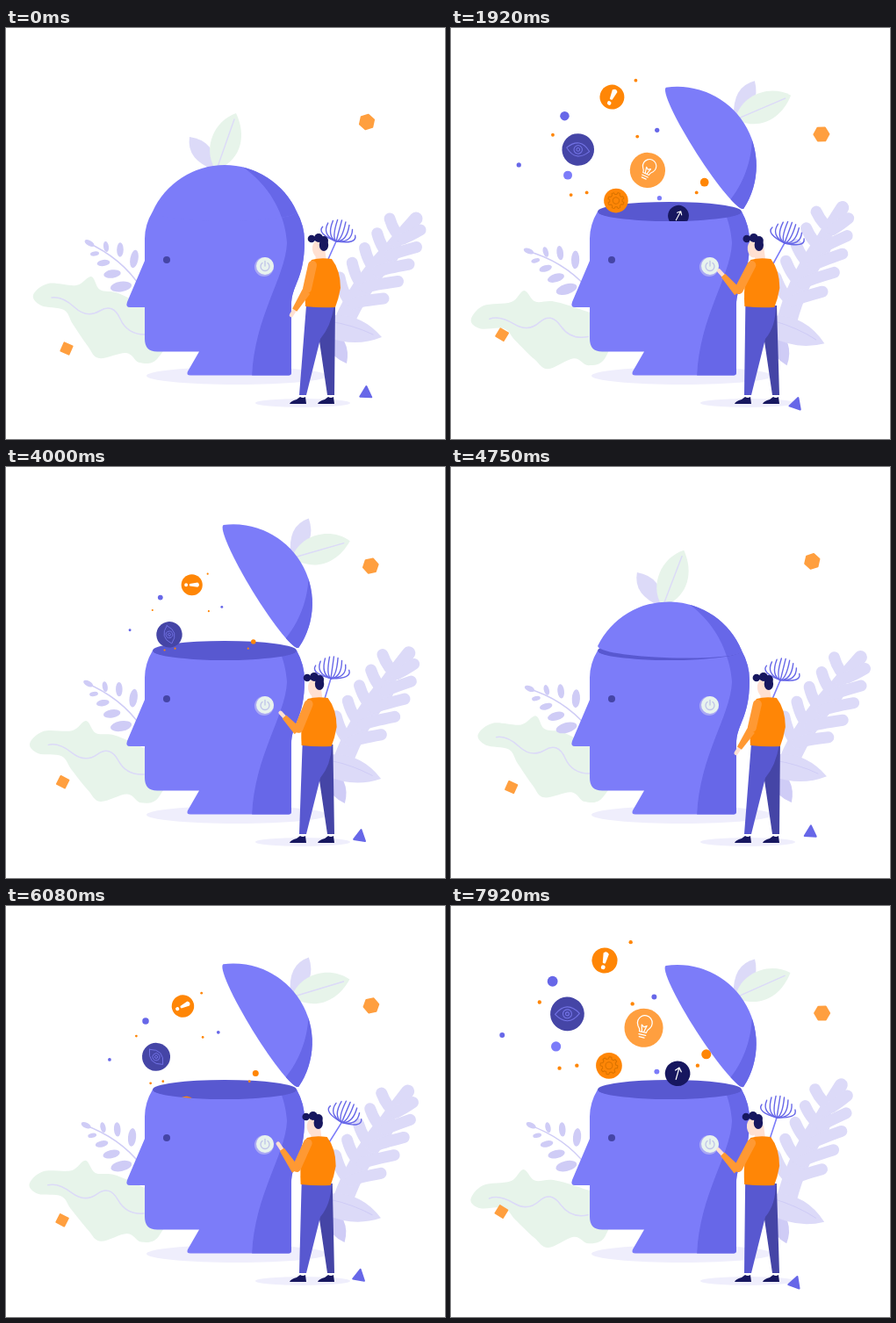
An HTML page with a canvas for the animation above (8 s loop, 500 px wide and 468 px high).

```html
<!DOCTYPE html>
<html>
<head>
<meta charset="utf-8">
<style>
  html, body { margin: 0; width: 100%; height: 100%; overflow: hidden; background: #fff; }
  canvas { display: block; }
</style>
</head>
<body>
<canvas width="500" height="468"></canvas>
<script>
const ctx = document.querySelector('canvas').getContext('2d');
const LOOP = 8000, CYCLE = 5000, TAU = 2 * Math.PI;
const MAIN = '#7c7cf9', SHADE = '#6767e8', INSIDE = '#5858d0', NAVY = '#17175f', INDIGO = '#4545a6';
const ORANGE = '#ff8606', AMBER = '#ff9f3f', SLEEVE = '#ff9933', SKIN = '#ffe0d2';
const GREEN = '#e7f4ea', LILAC = '#dcdaf8', MAUVE = '#cfccf6', SHADOW = '#efeefc';

const clamp = v => Math.max(0, Math.min(1, v));
const mix = (a, b, u) => a + (b - a) * u;
function ease(t, from, to) {
  const u = clamp((t - from) / (to - from));
  return u * u * (3 - 2 * u);
}

// Everything that moves, derived from the time within one cycle.
function pose(time) {
  const t = time % CYCLE;
  const sway = .52 * (1 - Math.cos(t / CYCLE * TAU));
  const lean = sway * sway;
  const open = ease(t, 0, 950) * (1 - ease(t, 4200, 4815));
  const reach = ease(t, 0, 600) * (1 - ease(t, 3700, 4850));
  return {
    sway,
    lid: (59.2 - 2 * sway) * open,
    spread: 11 * sway,
    hand: [mix(325, 311 - 7 * lean, reach), mix(327, 269 + 9 * lean, reach)],
    elbow: [mix(342, 331 - 5 * lean, reach), mix(300, 301, reach)],
    hip: -(5 + 2 * lean) * reach,
    head: -(5 + 7.5 * lean) * reach,
    flight: flight(t)
  };
}

// Coins drift out ever more slowly, then drop back: 0 is mid-air, 1 nearly at rest.
function flight(t) {
  const fall = Math.max(0, t - 3500) / 800;
  return 1.1 * (1 - Math.exp((830 - Math.min(t, 3500)) / 970)) - 2.7 * fall * fall;
}

const fill = (d, color) => { ctx.fillStyle = color; ctx.fill(new Path2D(d)); };
function line(d, color, width) {
  ctx.strokeStyle = color;
  ctx.lineWidth = width;
  ctx.lineCap = ctx.lineJoin = 'round';
  ctx.stroke(new Path2D(d));
}
function oval(x, y, rx, ry, color, deg = 0) {
  ctx.fillStyle = color;
  ctx.beginPath();
  ctx.ellipse(x, y, rx, ry, deg * Math.PI / 180, 0, TAU);
  ctx.fill();
}
const dot = (x, y, r, color) => oval(x, y, r, r, color);
function place(x, y, deg, draw, scale = 1) {
  ctx.save();
  ctx.translate(x, y);
  ctx.rotate(deg * Math.PI / 180);
  ctx.scale(scale, scale);
  draw();
  ctx.restore();
}
const pivot = (x, y, deg, draw) => place(x, y, deg, () => { ctx.translate(-x, -y); draw(); });
function clipped(d, draw) {
  ctx.save();
  ctx.clip(new Path2D(d));
  draw();
  ctx.restore();
}
// Closed Catmull-Rom outline through a few points.
function outline(points) {
  const n = points.length, at = i => points[(i + n) % n];
  const handle = (i, sign) => [0, 1].map(k => at(i)[k] + sign * (at(i + 1)[k] - at(i - 1)[k]) / 6);
  return points.reduce((d, p, i) => `${d}C${handle(i, 1)} ${handle(i + 1, -1)} ${at(i + 1)}`, `M${points[0]}`);
}

const BUSH = outline([[31, 304], [48, 291], [80, 293], [97, 283], [107, 298], [128, 302], [158, 318], [190, 340],
  [172, 377], [152, 381], [137, 370], [106, 376], [93, 362], [76, 337], [66, 321], [40, 316]]);
const BODY = 'M167 209Q158 224 158 240V265L138 312Q136 318 141 318H158V354Q158 368.5 172 368.5H220L207 391Q205 395.5 210 395.5'
  + 'H322Q325 395.5 325 392V316C325 292 340 287 340 243Q340 225 331 209Z';
const LID = 'M167 209A90 90 0 0 1 331 209A82 11 0 0 1 167 209Z';
const SIDE = 'M254 150C280 160 317 195 320 245C318 285 282 330 280 400H360V150Z';
const ABOVE_RIM = 'M0 0H500V209H331A82 11 0 0 1 167 209H0Z';

const ring = r => `M${r} 0A${r} ${r} 0 1 1 ${-r} 0A${r} ${r} 0 1 1 ${r} 0`;
function bang() {
  fill('M-1.6 3L-3.2 -8Q0 -12 3.2 -8L1.6 3Q0 4 -1.6 3Z', '#fff');
  dot(0, 8, 2.4, '#fff');
}
const eye = () => line('M-14 0Q0 -16 14 0Q0 16 -14 0Z' + ring(5) + ring(2), '#7373e6', 1.1);
function gear() {
  let d = ring(4);
  for (let i = 0; i <= 64; i++) {
    const a = i / 64 * TAU, r = i % 8 < 4 ? 10 : 7.8;
    d += `${i ? 'L' : 'M'}${r * Math.cos(a)} ${r * Math.sin(a)}`;
  }
  line(d, '#d97300', 1.1);
}
const bulb = () => line('M-4 5Q-4 2 -7 -1A8.5 8.5 0 1 1 7 -1Q4 2 4 5ZM-4 8H4M-3 11H3M-1 5L-3 -3L0 -1L3 -3L1 5', '#fff', 1.3);
const arrow = () => line('M0 7V-7M-3.5 -3L0 -7L3.5 -3', '#fff', 1.3);

// Resting places. Coins are in order of launch: each later one starts deeper in the head.
const coins = [
  [174, 60, 14.6, ORANGE, bang, 12], [131, 121, 19.5, INDIGO, eye, -3], [179, 180, 15, ORANGE, gear, 0],
  [219, 136, 22.3, AMBER, bulb, 12], [258, 188, 14.5, NAVY, arrow, 15]
];
const specks = [[204, 39], [99, 108], [206, 110], [122, 184], [142, 181], [281, 181]];
const beads = [[56, 146, 3], [231, 102, 3], [114, 84, 6]];
const lateBeads = [[118, 159, 5.7], [234, 188, 3]];

function drawCoins(q) {
  const left = 1 - q;
  const grow = start => clamp((q - start) / .1);
  const along = (x, y, depth) => [x + .39 * left * (268 - x), y + .39 * left * (245 + depth - y)];
  const bead = (x, y, r, color, start = -3) =>
    dot(...along(x, y, 0), r * Math.max(.2, 1 - .5 * left) * grow(start), color);
  clipped(ABOVE_RIM, () => {
    specks.forEach(([x, y]) => bead(x, y, 2.2, ORANGE));
    beads.forEach(([x, y, r]) => bead(x, y, r, SHADE));
    lateBeads.forEach(([x, y, r]) => bead(x, y, r, MAIN, .35));
    bead(291, 168, 5.6, ORANGE);
    coins.forEach(([x, y, r, color, icon, tilt], i) => {
      const size = Math.max(.2, 1 - (.17 + .07 * i) * left) * grow(.35 * i - .75);
      place(...along(x, y, 50 * i), tilt + 75 * Math.abs(left) ** 1.3, () => {
        dot(0, 0, r, color);
        icon();
      }, size);
    });
  });
}

function drawSprig() {
  line('M154 296Q132 262 92 244', MAUVE, 1.5);
  oval(95, 245, 6, 3, MAUVE, 30);
  for (let k = 0; k < 4; k++) {
    oval(114 + 16 * k, 249 + 3.5 * k * k, 3 + .8 * k, 6 + 2.2 * k, MAUVE, 9 * k - 8);
    oval(101 + 10 * k, 257 + 9.5 * k + k * k, 5 + 2.4 * k, 2.5 + 1.1 * k, MAUVE, -8);
  }
}

function drawFern() {
  line('M380 345Q405 285 467 217', LILAC, 15);
  line('M385 335Q402 295 436 258', LILAC, 23);
  for (let u = 0; u <= 1; u += .25) {
    const x = 452 - 57 * u, y = 240 + 74 * u;
    line(`M${x} ${y}Q${x - 10} ${y - 6} ${437 - 57 * u} ${217 + 67 * u}`, LILAC, 13);
    line(`M${x} ${y}Q${x + 8} ${y - 3} ${472 - 10 * u - 32 * u * u} ${230 + 78 * u}`, LILAC, 13);
  }
}

function drawPlants(t, sway) {
  pivot(170, 360, -12.5 * sway, () => {
    fill(BUSH, GREEN);
    line('M52 307Q64 305 78 318T107 322T130 331T158 349', LILAC, 1.5);
  });
  pivot(150, 292, -4.5 * (1 - Math.cos(t / 3500 * TAU)), drawSprig);
  pivot(375, 350, -9.6 * sway, drawFern);
  pivot(370, 345, 9 * sway, () => fill('M366 340Q394 354 388 382Q372 376 362 358Z', MAUVE));
  pivot(370, 335, 8 * sway, () => {
    fill('M366 328Q402 322 428 352Q398 364 366 352Z', LILAC);
    line('M368 334Q395 338 418 349', MAUVE, 1);
  });
  pivot(355, 290, 8 * Math.sin(t / 4850 * TAU), () => {
    line('M355 290L376 243', MAIN, 1.6);
    place(376, 243, 15, () => {
      for (let i = -4; i <= 4; i++) line(`M0 0Q${i * 6} -3 ${i * 4.8} ${.8 * i * i - 25}`, SHADE, 1.4);
    });
  });
}

function drawHead({ lid, spread, flight }) {
  fill(BODY, MAIN);
  clipped(BODY, () => fill(SIDE, SHADE));
  if (lid > .05) {
    oval(249, 209, 82, 11, INSIDE);
    drawCoins(flight);
  }
  pivot(335, 209.5, lid, () => {
    pivot(236, 157, spread, () => fill('M238 162Q205 150 209 124Q238 128 240 160Z', LILAC));
    pivot(240, 157, -spread, () => {
      fill('M238 160C224 138 236 106 262 97C274 122 268 148 244 160Z', GREEN);
      line('M241 158L260 104', LILAC, 1.4);
    });
    fill(LID, MAIN);
    clipped(LID, () => fill(SIDE, SHADE));
  });
  dot(183, 264, 4, INDIGO);
  dot(294, 272, 11, '#a9a8f4');
  dot(295, 271, 10, '#e8f3ee');
  line('M292 267.5A5 5 0 1 0 298 267.5M295 265.5V271', '#bfc3e8', 1.3);
}

function drawArm([ex, ey], [hx, hy], hip) {
  const wrist = [mix(ex, hx, .78), mix(ey, hy, .78)];
  line(`M${wrist}L${hx} ${hy}`, SKIN, 4.5);
  line(`M${349 + hip} 270L${ex + 1} ${ey - 3}`, SLEEVE, 10);
  const length = Math.hypot(hx - ex, hy - ey), nx = (ey - hy) / length, ny = (hx - ex) / length;
  const side = ([x, y], w) => `${x + nx * w} ${y + ny * w}`;
  fill(`M${side([ex, ey], 5)}L${side(wrist, 3)}L${side(wrist, -3)}L${side([ex, ey], -5)}Z`, SLEEVE);
}

function drawPerson({ hip, head, elbow, hand }) {
  fill(`M${350 + hip} 316H${375 + hip * .6}L374 418H366L356 350Z`, INDIGO);
  fill(`M${342 + hip} 316H${374 + hip * .6}Q370 340 358 354L342 418H334Z`, INSIDE);
  for (const x of [323, 355])
    fill(`M${x} 428Q${x + 1} 425 ${x + 8} 423L${x + 12} 420Q${x + 15} 422 ${x + 18} 420L${x + 19} 428Z`, NAVY);

  place(hip, 0, 0, () => fill('M352 266L354 250H363L365 266Z', SKIN));
  place(head, 0, 0, () => {
    oval(355, 252, 6, 9.5, SKIN, -8);
    dot(348, 240, 4.3, NAVY);
    dot(356, 239, 5, NAVY);
    dot(362, 242, 5, NAVY);
    oval(362, 247, 5.2, 7, NAVY);
  });
  place(hip, 0, 0, () => fill('M348 264Q358 261 371 263Q381 276 381 296Q379 308 375 318Q358 319 341 317Q340 300 342 285Q344 270 348 264Z', ORANGE));
  drawArm(elbow, hand, hip);
}

function drawShapes(sway) {
  const solid = (x, y, deg, d, color) => place(x, y, deg, () => {
    fill(d, color);
    line(d, color, 2);
  });
  solid(69 - 12 * sway, 365 - 17.5 * sway, 24 + 8 * sway, 'M-5 -5H5V5H-5Z', AMBER);
  solid(411 + 12 * sway, 107 + 15.5 * sway, 18 * sway - 18, 'M8.5 0L4.2 7.4H-4.2L-8.5 0L-4.2 -7.4H4.2Z', AMBER);
  solid(410 - 18.5 * sway, 415 + 14 * sway, 3 + 17 * sway, 'M0 -7L6.5 5H-6.5Z', SHADE);
}

function frame() {
  const t = performance.now() % LOOP, now = pose(t);
  ctx.fillStyle = '#fff';
  ctx.fillRect(0, 0, 500, 468);
  oval(263, 396, 103, 10, SHADOW);
  oval(338, 427, 54, 5, SHADOW);
  drawPlants(t, now.sway);
  drawHead(now);
  drawPerson(now);
  drawShapes(now.sway);
  requestAnimationFrame(frame);
}
frame();
</script>
</body>
</html>
```
